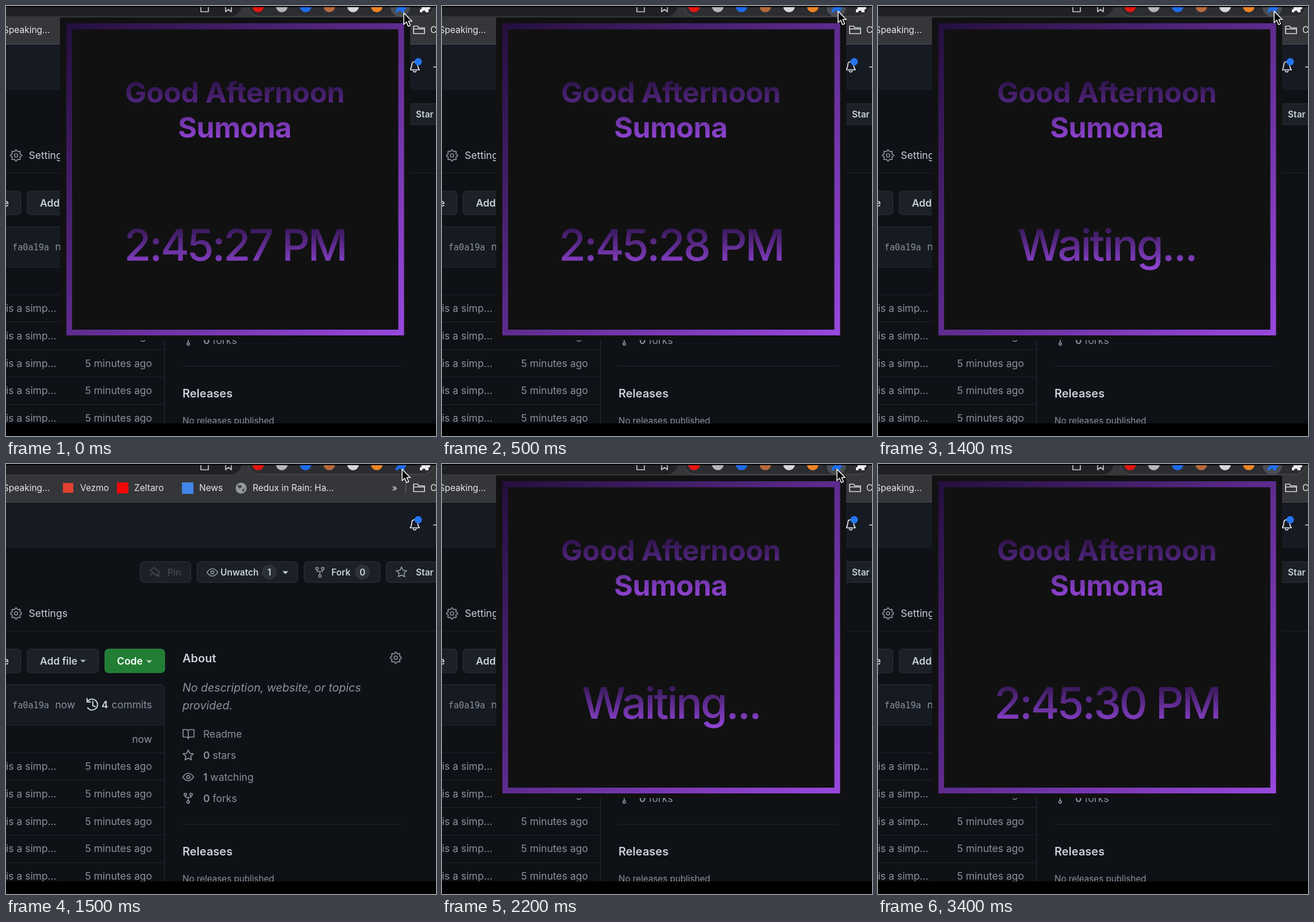
Animation, 748 px wide and 748 px high, one loop 3.5 s. Source, as an HTML page:

```html
<!DOCTYPE html>
<html lang="en">
<head>
<meta charset="utf-8">
<title>Greeting popup</title>
<style>
  html, body { margin: 0; width: 100%; height: 100%; overflow: hidden; background: #000; }
  svg { display: block; width: 100vw; height: 100vh; }
  text { font: 17.5px Inter, sans-serif; fill: #8b929c; white-space: pre; }
  .light { fill: #c9d1d9; }
  .bold { font-weight: 600; fill: #c9d1d9; }
  .button { font-size: 15.5px; font-weight: 600; fill: #c9d1d9; }
  .head { font-size: 20px; font-weight: 600; fill: #c9d1d9; }
  .note { font-size: 19.6px; font-style: italic; }
  .mark { font-size: 15.5px; fill: #e4e6ea; }
  .end { text-anchor: end; }
  .mid { text-anchor: middle; }
  .box { fill: #1c2027; stroke: #30353d; }
  .rule { stroke: #22272e; fill: none; }
  .icon { fill: none; stroke: #8b929c; stroke-width: 1.7; stroke-linejoin: round; stroke-linecap: round; }
  .title { font-size: 50px; font-weight: 700; letter-spacing: -.01em; text-anchor: middle; fill: url(#titleFill); }
  .clock { font-size: 76px; font-weight: 500; letter-spacing: -.041em; text-anchor: middle; fill: url(#clockFill); }
</style>
</head>
<body>
<svg viewBox="0 0 748 748">
  <defs>
    <linearGradient id="frameFill" x2="1" y2="1">
      <stop stop-color="#240f3d"/><stop offset="1" stop-color="#9848de"/>
    </linearGradient>
    <linearGradient id="titleFill" href="#frameFill" gradientUnits="userSpaceOnUse" x1="0" y1="120" x2="0" y2="240"/>
    <linearGradient id="clockFill" href="#frameFill" gradientUnits="userSpaceOnUse" x1="0" y1="371" x2="0" y2="462"/>
    <clipPath id="screen"><path d="M0 2H748V726H0Z"/></clipPath>
    <path id="gear"/>
    <path id="star"/>
    <path id="caret" d="M-5-2H5L0 3Z"/>
    <g id="eye"><path d="M-9.5 0Q0-13 9.5 0Q0 13-9.5 0Z"/><circle r="2.7"/></g>
    <g id="fork">
      <circle cx="-5" cy="-6" r="2.2"/><circle cx="5" cy="-6" r="2.2"/><circle cy="7" r="2.2"/>
      <path d="M-5-4V-3Q-5-1-3-1H3Q5-1 5-3V-4M0-1V5"/>
    </g>
    <path id="puzzle" d="M-8-6H-3A3 3 0 0 1 3-6H7V-1A3 3 0 0 1 7 5V10H2A3 3 0 0 0-4 10H-8V5A3 3 0 0 0-8-1Z"/>
  </defs>

  <g clip-path="url(#screen)">
    <path fill="#0e1116" d="M0 0H748V748H0Z"/>

    <!-- browser bars -->
    <path fill="#35363a" d="M0 0H748V66H0Z"/>
    <path stroke="#4b4d51" d="M0 66.5H748"/>
    <rect x="-40" y="-22" width="450" height="40" rx="20" fill="#202124"/>
    <rect x="421" y="-22" width="324" height="40" rx="20" fill="#2c2d31" stroke="#505257"/>
    <path class="icon" style="stroke:#c6c8cc" d="M339 0V10H352V0M382 0V10L387 6L392 10V0"/>
    <circle id="glow" cx="686" cy="2" r="17" fill="#4b4e55"/>
    <g id="extensions"></g>
    <use href="#puzzle" x="686" y="1" fill="#1f6ff0"/>
    <use href="#puzzle" x="728" y="1" fill="#eceef0"/>

    <text class="mark end" x="76.500" y="47">Speaking...</text>
    <rect x="99" y="33" width="18" height="17" fill="#e2402f"/>
    <text class="mark" x="129" y="47">Vezmo</text>
    <rect x="193" y="32" width="20" height="19" fill="#f00808"/>
    <text class="mark" x="223" y="47">Zeltaro</text>
    <rect x="306" y="32" width="20" height="20" fill="#4285e8"/>
    <text class="mark" x="336" y="47">News</text>
    <circle cx="409" cy="42" r="9.500" fill="#969a9f"/>
    <path d="M402 38L408 36L411 40L406 43ZM410 45L416 42L413 49Z" fill="#45474b"/>
    <text class="mark" x="429" y="47">Redux in Rain: Ha...</text>
    <text class="mark mid" x="676" y="47">»</text>
    <path stroke="#65676b" d="M695.500 32V52"/>
    <path class="icon" style="stroke:#d4d6da" d="M709 48V35H716L718 38H728V48ZM709 40H728"/>
    <text class="mark" x="738" y="47">C</text>

    <!-- page header and actions -->
    <path fill="#161a23" d="M0 67H748V146H0Z"/>
    <path class="icon" style="stroke:#e6e9ee" d="M703 111Q706 107 706 102Q706 97 711 97Q716 97 716 102Q716 107 719 111ZM708.500 113Q711 117 713.500 113M744 106H752"/>
    <circle cx="717" cy="97" r="6.500" fill="#2375f0"/>

    <g class="box">
      <rect x="233.500" y="170" width="88" height="36" rx="6"/>
      <rect x="332.500" y="170" width="175" height="36" rx="6"/>
      <rect x="518.500" y="170" width="132" height="36" rx="6"/>
      <rect x="661.500" y="170" width="120" height="36" rx="6"/>
      <rect x="-30" y="322" width="56" height="41" rx="6"/>
      <rect x="37" y="322" width="124" height="41" rx="6"/>
    </g>
    <path class="icon" style="stroke:#41464e" d="M251 185L258 180L268 189L262 195ZM262 191L268 196M256 188L251 194"/>
    <text class="button" x="281" y="193.500" style="fill:#41464e">Pin</text>
    <use class="icon" href="#eye" x="359" y="188.500"/>
    <text class="button" x="373" y="193.500">Unwatch</text>
    <circle cx="458" cy="188" r="13" fill="#2c3139"/>
    <text class="button mid" x="458" y="193.500">1</text>
    <use href="#caret" x="486" y="188.500" fill="#c9d1d9"/>
    <use class="icon" href="#fork" x="546" y="188"/>
    <text class="button" x="566" y="193.500">Fork</text>
    <circle cx="620" cy="188" r="13" fill="#2c3139"/>
    <text class="button mid" x="620" y="193.500">0</text>
    <use class="icon" href="#star" x="688" y="188.500"/>
    <text class="button" x="713" y="193.500">Star</text>

    <use class="icon" href="#gear" x="17.500" y="260"/>
    <text class="light" x="39.500" y="266">Settings</text>
    <path class="rule" d="M0 290.500H748"/>
    <text class="bold end" x="5" y="348.500">e</text>
    <text class="bold" x="59" y="348.500">Add file</text>
    <use href="#caret" x="134" y="342.500" fill="#a5adb6"/>
    <rect x="172" y="322" width="104" height="41" rx="6" fill="#217e34" stroke="#38904a"/>
    <text class="bold" x="193" y="348.500" style="fill:#fff">Code</text>
    <use href="#caret" x="249" y="343.500" fill="#b9d8bf"/>

    <!-- file list -->
    <path fill="#161a23" d="M0 384H269Q275 384 275 390V454H0Z"/>
    <path class="rule" style="stroke:#2b3038" d="M0 384H269Q275.500 384 275.500 390V748"/>
    <text x="11" y="425" style="font:15.200px 'DejaVu Sans Mono',monospace">fa0a19a</text>
    <text x="85.500" y="425">now</text>
    <path class="icon" style="stroke:#c9d1d9;stroke-width:2" d="M142 413A9.500 9.500 0 1 1 142 424M141 408V414H147M151 413V420L155 422"/>
    <text class="bold" x="166" y="425">4</text>
    <text class="end" x="254" y="425">commits</text>
    <text class="end" x="254" y="485">now</text>
    <g id="rows"></g>

    <!-- sidebar -->
    <text class="head" x="307" y="344.500">About</text>
    <use class="icon" href="#gear" x="678" y="337"/>
    <text class="note" x="307" y="396">No description, website, or topics</text>
    <text class="note" x="307" y="427">provided.</text>
    <path class="icon" d="M308 462H314Q317 462 317 465Q317 462 320 462H327V475H320Q317 475 317 478Q317 475 314 475H308ZM317 465V477"/>
    <text x="343" y="475.500">Readme</text>
    <use class="icon" href="#star" x="317" y="507"/>
    <text x="343" y="513"><tspan font-weight="600">0</tspan> stars</text>
    <use class="icon" href="#eye" x="317" y="544.500"/>
    <text x="343" y="550.500"><tspan font-weight="600">1</tspan> watching</text>
    <use class="icon" href="#fork" x="317" y="581"/>
    <text x="343" y="587.500"><tspan font-weight="600">0</tspan> forks</text>
    <path class="rule" d="M307 626.500H689"/>
    <text class="head" x="307" y="681">Releases</text>
    <text x="307" y="727" style="font-size:15.200px">No releases published</text>

    <g id="popup">
      <rect x="94" y="20" width="609" height="561" rx="2" fill="#111112"/>
      <path fill="url(#frameFill)" fill-rule="evenodd" d="M105 30H692.500V573H105ZM115 40.500V563H682.500V40.500Z"/>
      <text class="title" x="398" y="168">Good Afternoon</text>
      <text class="title" x="398" y="228.500">Sumona</text>
      <text class="clock" id="clock" x="398.500" y="443"></text>
    </g>

    <path id="cursor" d="M0 0V20L4.600 15.800L7.800 23.400L11.400 21.900L8.200 14.500H14.300Z" fill="#000" stroke="#fff" stroke-width="1.500" stroke-linejoin="round"/>
  </g>
</svg>
<script>
const LOOP = 3500, STEP = 100;
const get = id => document.getElementById(id);

// Closed outline around the origin whose radius cycles through the given list
function ring(count, radii, turn) {
  const points = Array.from({ length: count }, (_, i) => {
    const angle = (i + turn) / count * 2 * Math.PI, r = radii[i % radii.length];
    return `${(r * Math.sin(angle)).toFixed(2)} ${(-r * Math.cos(angle)).toFixed(2)}`;
  });
  return `M${points.join('L')}Z`;
}
get('star').setAttribute('d', ring(10, [9.5, 4.4], 0));
get('gear').setAttribute('d', ring(32, [9.6, 9.6, 7.4, 7.4], -.5) + 'M-3 0A3 3 0 1 0 3 0A3 3 0 1 0-3 0');

get('extensions').innerHTML = ['#e5150f', '#b4b6ba', '#1d6bea', '#b5693a', '#d5d7da', '#ee8424']
  .map((color, i) => `<circle cx="${438.5 + i * 41.3}" cy="1" r="10" fill="${color}"/>`).join('');

get('rows').innerHTML = [0, 1, 2, 3, 4, 5].map(i => {
  const y = 454.5 + i * 47.7;
  const line = `<path class="rule" d="M0 ${Math.floor(y) + .5}H275"/>`;
  return i ? `${line}<text x="0" y="${y + 30}">is a simp...</text>
    <text class="end" x="254" y="${y + 30}">5 minutes ago</text>` : line;
}).join('');

// [start, popup text or '' when closed]
const states = [
  [0, '2:45:27 PM'], [200, '2:45:28 PM'], [1000, ''], [1300, 'Waiting...'],
  [1500, ''], [1700, 'Waiting...'], [2500, '2:45:29 PM'], [3400, '2:45:30 PM']
];
// [time, x, y] of the pointer tip
const path = [
  [0, 692, 12], [300, 689, 9], [1700, 689, 9], [2100, 687, 9],
  [2600, 687, 9], [3000, 690, -30], [3500, 690, -30]
];

function pointerAt(t) {
  const next = path.findIndex(p => p[0] > t);
  const [a, b] = [path[next - 1], path[next]];
  const k = (t - a[0]) / (b[0] - a[0]), ease = k * k * (3 - 2 * k);
  return [1, 2].map(i => a[i] + (b[i] - a[i]) * ease);
}

function draw(now) {
  const t = Math.floor(now % LOOP / STEP) * STEP;
  const label = states.findLast(s => s[0] <= t)[1];
  get('popup').style.display = label ? '' : 'none';
  get('glow').style.display = label || t < 1300 ? '' : 'none';
  get('clock').textContent = label;
  get('cursor').setAttribute('transform', `translate(${pointerAt(t)})`);
}

const start = performance.now();
function tick() {
  draw(performance.now() - start);
  requestAnimationFrame(tick);
}
tick();
</script>
</body>
</html>
```
